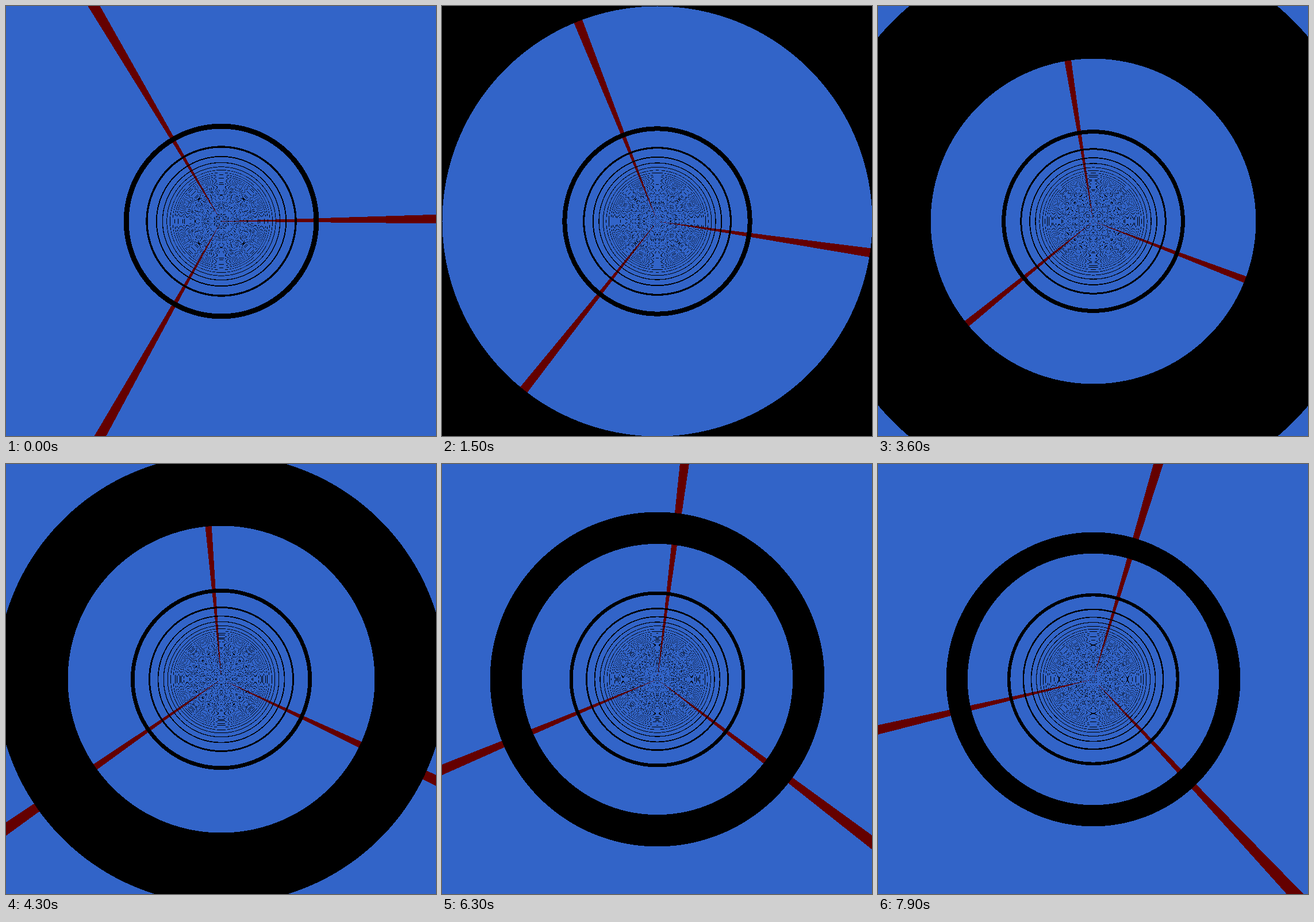
An HTML page with a canvas for the animation above (8000 ms loop, 748x748 px).

```html
<!DOCTYPE html>
<html lang="en">
<head>
<meta charset="utf-8">
<title>Tunnel</title>
<style>
  html, body { margin: 0; width: 100%; height: 100%; overflow: hidden; background: #000; }
  canvas { display: block; width: 100%; height: 100%; image-rendering: pixelated; }
</style>
</head>
<body>
<canvas id="stage" width="748" height="748"></canvas>
<script>
const SIZE = 748;
const HALF = SIZE / 2;
const STEP_MS = 100;
const STEPS = 80;
const STEPS_PER_CYCLE = 200;
const RING_WIDTH = 0.15;  // share of one depth period
const RAY_WIDTH = 0.02;   // share of one 120 degree sector
const SECTORS = 3;

const ctx = document.getElementById("stage").getContext("2d");
const image = ctx.createImageData(SIZE, SIZE);
const pixels = new Uint32Array(image.data.buffer);

// Packed as ABGR for little-endian image data
const rgb = (r, g, b) => (255 << 24 | b << 16 | g << 8 | r) >>> 0;
const BLACK = rgb(0, 0, 0);
const RED = rgb(100, 0, 0);
const BLUE = rgb(50, 100, 200);

const fract = v => v - Math.floor(v);

// Tunnel coordinates of every pixel: depth along the axis, turn around it
const depth = new Float64Array(SIZE * SIZE);
const turn = new Float64Array(SIZE * SIZE);
for (let y = 0, i = 0; y < SIZE; y++) {
  for (let x = 0; x < SIZE; x++, i++) {
    const dx = x - HALF, dy = y - HALF;
    const radius = Math.sqrt(dx * dx + dy * dy) / SIZE;
    depth[i] = 0.01 / (radius * radius * radius);
    turn[i] = Math.atan2(dy, dx) / (2 * Math.PI) * SECTORS;
  }
}

function draw(step) {
  const phase = (step + 1) / STEPS_PER_CYCLE;
  for (let i = 0; i < pixels.length; i++) {
    if (fract(depth[i] - phase) >= 1 - RING_WIDTH) pixels[i] = BLACK;
    else if (fract(turn[i] - phase) >= 1 - RAY_WIDTH) pixels[i] = RED;
    else pixels[i] = BLUE;
  }
  ctx.putImageData(image, 0, 0);
}

const start = performance.now();
let shown = 0;
draw(shown);

function tick() {
  const step = Math.floor((performance.now() - start) / STEP_MS) % STEPS;
  if (step !== shown) {
    shown = step;
    draw(step);
  }
  requestAnimationFrame(tick);
}
requestAnimationFrame(tick);
</script>
</body>
</html>
```
